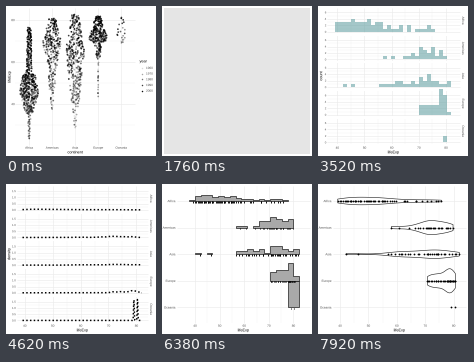
A matplotlib script that plays this animation: 150 by 150 pixels, repeating every 8 s.

```python
import matplotlib.pyplot as plt
import numpy as np
from matplotlib.animation import FuncAnimation
from matplotlib.patches import PathPatch, Rectangle
from matplotlib.textpath import TextPath
from matplotlib.transforms import Affine2D

SIZE, DPI = 150, 100
PT = 72 / DPI
TICK, INTERVAL, LOOP = 220, 20, 8000
FONT = {"family": "Liberation Sans"}

NAMES = ["Africa", "Americas", "Asia", "Europe", "Oceania"]
HUES = ["#F8766D", "#A3A500", "#00BF7D", "#00B0F6", "#E76BF3"]
TEAL, DARK, GREY, PALE = "#5F9EA0", "#595959", "#E5E5E5", "#EBEBEB"

rng = np.random.default_rng(7)


def sample(n, share, values):
    """Spread n values evenly over a quantile curve, with a little jitter."""
    u = np.linspace(0, 1, n)
    u[1:-1] += rng.uniform(-.8, .8, max(n - 2, 0)) / n
    return np.sort(np.interp(u, share, values))


def density(v, grid, adjust=1.0):
    q1, q3 = np.percentile(v, [25, 75])
    bw = 0.9 * min(v.std(ddof=1), (q3 - q1) / 1.34) * len(v) ** -0.2 * adjust
    z = (np.asarray(grid)[:, None] - v) / bw
    return np.exp(-z * z / 2).mean(1) / (bw * np.sqrt(2 * np.pi))


def history(n, *values):
    v = sample(n, [0, .05, .25, .5, .75, 1], values)
    age = np.floor((.35 * np.linspace(0, 1, n) + .65 * rng.random(n)) * 11.9)
    d = density(v, v)
    swarm = rng.uniform(-1, 1, n) * d / d.max()
    return v, age / 11, swarm, rng.random(n)


def latest(n, *values):
    return sample(n, [0, .04, .25, .5, .75, 1], values)


# Life expectancy over all years, then for the last survey only
HISTORY = [history(624, 23.6, 35.5, 42.4, 47.8, 54.4, 76.4),
           history(300, 37.6, 46, 58.4, 67, 71.7, 80.7),
           history(396, 28.8, 40, 51.4, 61.8, 69.5, 82.6),
           history(360, 43.6, 62, 69.6, 72.2, 75.5, 81.8),
           history(24, 69.1, 69.4, 71.2, 73.7, 77.6, 81.2)]
LIFE = [latest(52, 39.2, 40.5, 45.3, 51.2, 58.2, 75.7),
        latest(25, 58.1, 63.8, 69.9, 72, 75.3, 79.8),
        latest(33, 42.1, 56.8, 63.6, 71, 74.8, 82),
        latest(30, 70.8, 71.3, 74.1, 77.5, 78.9, 80.6),
        latest(2, 79.1, 79.2, 79.4, 79.7, 80, 80.4)]

fig = plt.figure(figsize=(SIZE / DPI, SIZE / DPI), dpi=DPI, facecolor="white")
scenes = []


def scene():
    ax = fig.add_axes([0, 0, 1, 1])
    ax.set(xlim=(0, SIZE), ylim=(SIZE, 0), visible=False)
    ax.axis("off")
    scenes.append(ax)
    return ax


def label(ax, x, y, s, px=3.1, color="#4D4D4D", align=.5, rot=0):
    path = TextPath((0, 0), s, size=px, prop=FONT)
    place = (Affine2D().translate(-path.get_extents().x1 * align, -.36 * px)
             .rotate_deg(rot).scale(1, -1).translate(x, y))
    ax.add_patch(PathPatch(path, fc=color, lw=0, zorder=4,
                           transform=place + ax.transData))


def title(ax, x, y, s, **kw):
    label(ax, x, y, s, 3.8, "black", **kw)


def line(ax, x, y, color="black", px=.6, **kw):
    ax.plot(x, y, color=color, lw=px * PT, **kw)


def dots(ax, x, y, px, color="black", **kw):
    ax.scatter(x, y, s=(px * PT) ** 2, c=color, linewidths=0, zorder=3, **kw)


def rect(ax, x0, y0, x1, y1, fill, edge="none", px=.6, **kw):
    ax.add_patch(Rectangle((x0, y0), x1 - x0, y1 - y0, fc=fill, ec=edge,
                           lw=0 if edge == "none" else px * PT, **kw))


def grid(ax, xs, ys, box, color=PALE, px=.6):
    x0, x1, y0, y1 = box
    ax.vlines(xs, y0, y1, color=color, lw=px * PT, zorder=.5)
    ax.hlines(ys, x0, x1, color=color, lw=px * PT, zorder=.5)


# Continent on x, life expectancy on y

def life_y(v):
    return 14 + (80 - np.asarray(v)) * 2.1


def columns(legend, right=123):
    ax = scene()
    left = 9.3
    step = (right - left) / 5.2
    cx = left + step * (np.arange(5) + .6)
    box = (left, right, 2.3, 138.6)
    grid(ax, cx, life_y([40, 60, 80]), box)
    grid(ax, [], life_y([30, 50, 70]), box, px=.3)
    for v in (40, 60, 80):
        label(ax, 8.6, life_y(v), str(v), align=1)
    for x, name in zip(cx, NAMES):
        label(ax, x, 141.6, name)
    title(ax, (left + right) / 2, 146, "continent")
    title(ax, 3.2, 71, "lifeExp", rot=90)
    for k, (name, c) in enumerate(zip(NAMES, HUES)):
        y = 61.8 + 5.7 * k
        if legend == "year":
            dots(ax, [136], [y], 1.5, alpha=.15 + .2 * k)
            label(ax, 140, y, str(1960 + 10 * k), align=0)
        else:
            rect(ax, 129.5, y - 1.9, 133.6, y + 1.9, "none", c)
            line(ax, [129.5, 133.6], [y, y], c)
            label(ax, 135.6, y, name, align=0)
    title(ax, 133.5 if legend == "year" else 129, 55, legend, align=0)
    return ax, cx, step


def swarm(legend, right=123):
    ax, cx, _ = columns(legend, right)
    for x, c, (v, age, off, _) in zip(cx, HUES, HISTORY):
        half = 6 if len(v) < 30 else 9.2
        if legend == "year":
            dots(ax, x + off * half, life_y(v), 1.7, alpha=.1 + .9 * age)
        else:
            dots(ax, x + off * half, life_y(v), 1.5, c)


def half_boxes(points):
    ax, cx, step = columns("continent")
    for x, c, (v, _, off, jit) in zip(cx, HUES, HISTORY):
        q1, med, q3 = np.percentile(v, [25, 50, 75])
        reach = 1.5 * (q3 - q1)
        lo, hi = v[v >= q1 - reach].min(), v[v <= q3 + reach].max()
        a = x - step * .375
        rect(ax, a, life_y(q3), x, life_y(q1), "white", c, .7, zorder=2)
        line(ax, [a, x], life_y([med, med]), c, 1.1)
        line(ax, [x, x], life_y([lo, q1]), c, .45)
        line(ax, [x, x], life_y([q3, hi]), c, .45)
        if points:
            spread = jit if points == "jitter" else np.abs(off)
            dots(ax, x + .6 + spread * step * .38, life_y(v), 1.1, c, alpha=.8)


def half_violins(points):
    ax, cx, step = columns("continent")
    for x, c, (v, _, _, jit) in zip(cx, HUES, HISTORY):
        ys = np.linspace(v.min(), v.max(), 150)
        d = density(v, ys)
        ax.fill(np.r_[x, x - d / d.max() * step * .42, x],
                life_y(np.r_[ys[0], ys, ys[-1]]), fc="white", ec=c,
                lw=.7 * PT, zorder=2)
        if points:
            dots(ax, x + .6 + jit * step * .38, life_y(v), 1.1, c, alpha=.8)


# Life expectancy on x

def scale(x40, x80):
    return lambda v: x40 + (np.asarray(v) - 40) * (x80 - x40) / 40


def x_axis(ax, sx, box, color=PALE):
    ticks = np.arange(40, 81, 10)
    grid(ax, sx(ticks), [], box, color)
    grid(ax, sx(ticks[:-1] + 5), [], box, color, .3)
    for t in ticks:
        label(ax, sx(t), 141.6, str(t))
    title(ax, (box[0] + box[1]) / 2, 146, "lifeExp")


def blank():
    rect(scene(), 1.5, 1.8, 147.5, 147.5, GREY)


def empty_panel():
    ax = scene()
    rect(ax, 3, 1.8, 147.5, 138, GREY, zorder=.2)
    x_axis(ax, scale(14, 135), (3, 147.5, 1.8, 138), "white")


# One facet per continent

PANEL_H, PANEL_STEP = 24.85, 27.65


def facets(ylab, levels, unit, box, sx, form="{}", grey=False):
    ax = scene()
    left, right = box
    ink = "white" if grey else PALE
    tops = 2.1 + PANEL_STEP * np.arange(5)
    bases = tops + PANEL_H * .9545
    x_axis(ax, sx, (left, right, tops[0], tops[-1] + PANEL_H), ink)
    for top, base, name in zip(tops, bases, NAMES):
        bottom = top + PANEL_H
        ys = base - np.array(levels) * unit
        if grey:
            rect(ax, left, top, right, bottom, GREY, zorder=.2)
            rect(ax, right, top, 148, bottom, "#D9D9D9", zorder=.2)
        rect(ax, left, bottom, right, top + PANEL_STEP, "white", zorder=.8)
        grid(ax, [], ys, (left, right, top, bottom), ink)
        grid(ax, [], (ys[1:] + ys[:-1]) / 2, (left, right, 0, 0), ink, .3)
        for y, n in zip(ys, levels):
            label(ax, left - .8, y, form.format(n), 2.8, align=1)
        label(ax, 145.2, top + PANEL_H / 2, name, rot=-90)
    title(ax, 2.8, 70, ylab, rot=90)
    return ax, bases


WIDTH = 1.476
EDGES = (np.arange(26, 57) - .5) * WIDTH


def hist_facets(kind="bars", color=TEAL, alpha=.57, grey=False):
    sx, unit = scale(19.3, 128), 3.24
    ax, bases = facets("count", [0, 2, 4, 6], unit, (9, 141.5), sx, grey=grey)
    for v, base in zip(LIFE, bases):
        n = np.histogram(v, EDGES)[0]
        if kind == "bars":
            ax.bar(sx(EDGES[:-1]), -n * unit, WIDTH * 108.7 / 40, bottom=base,
                   align="edge", color=color, alpha=alpha, lw=0,
                   antialiased=False)
        elif kind == "line":
            line(ax, sx((EDGES[1:] + EDGES[:-1]) / 2), base - n * unit, color)
        elif kind == "rug":
            ax.vlines(sx(v), base, base - 2, color="black", lw=.5 * PT)


def density_facets(adjust=.3, dotted=False, fill=None):
    sx, unit = scale(18.7, 130.4), 12.5
    ax, bases = facets("density", [0.0, 0.5, 1.0, 1.5], unit, (10.5, 142),
                       sx, "{:.1f}")
    xs = np.linspace(39.2, 82, 420)
    for v, base, hue in zip(LIFE, bases, HUES):
        ys = base - density(v, xs, adjust) * unit
        if fill:
            ax.fill_between(sx(xs), ys, base, alpha=.6, lw=0,
                            color=hue if fill == "hues" else fill)
        if dotted:
            line(ax, sx(xs), ys, px=1.5, ls=(0, (1, 1.5)))
        else:
            line(ax, sx(xs), ys)


# One row per continent

ROWS = 17 + 26.6 * np.arange(5)


def rows(sx):
    ax = scene()
    box = (14.5, 148, 1.5, 138.6)
    x_axis(ax, sx, box)
    grid(ax, [], ROWS, box)
    for y, name in zip(ROWS, NAMES):
        label(ax, 13.4, y, name, align=1)
    return ax


def runs(mask):
    jumps = np.flatnonzero(np.diff(np.r_[0, mask.astype(int), 0]))
    return zip(jumps[::2], jumps[1::2])


def ridges(kind, ticks=False):
    sx = scale(33, 131.4)
    ax = rows(sx)
    edges = 80 + 2.35 * np.arange(-18, 2)
    xs = np.linspace(37, 84, 240)
    for k, (v, y) in enumerate(zip(LIFE, ROWS)):
        if kind == "bins":
            h = np.histogram(v, edges)[0] / len(v) * 52
            for a, b in runs(h > 0):
                ax.fill(np.repeat(sx(edges[a:b + 1]), 2),
                        np.r_[y, y - np.repeat(h[a:b], 2), y],
                        fc="#A9A9A9", ec="black", lw=.6 * PT, zorder=1 + k / 10)
        elif len(v) > 2:
            d = y - density(v, xs) * 190
            ax.fill_between(sx(xs), d, y, color="#A9A9A9", lw=0)
            line(ax, sx(xs), d)
        if ticks:
            ax.vlines(sx(v), y + .1, y + 1.5, color="black", lw=.9 * PT,
                      zorder=3)


def violins(shape=None, points=True):
    sx = scale(22, 135.6)
    ax = rows(sx)
    for v, y in zip(LIFE, ROWS):
        if shape == "violin" and len(v) > 2:
            xs = np.linspace(v.min(), v.max(), 200)
            d = density(v, xs) * 95
            ax.fill(sx(np.r_[xs, xs[::-1]]), np.r_[y - d, (y + d)[::-1]],
                    fc="white", ec="#222222", lw=.6 * PT, zorder=1)
        elif shape == "box":
            q1, med, q3 = np.percentile(v, [25, 50, 75])
            rect(ax, sx(q1), y - 10, sx(q3), y + 10, "white", "#333333")
            line(ax, sx([med, med]), [y - 10, y + 10], px=1.1)
            line(ax, sx([v.min(), q1]), [y, y])
            line(ax, sx([q3, v.max()]), [y, y])
        if points:
            dots(ax, sx(v), np.full(len(v), y), 1.8)


def build():
    swarm("year", right=129)
    swarm("continent")
    half_boxes(None)
    half_boxes("swarm")
    half_boxes("jitter")
    half_violins(False)
    half_violins(True)
    half_violins(True)

    blank()
    empty_panel()
    hist_facets(None, grey=True)
    hist_facets("rug", grey=True)
    hist_facets(color=DARK, alpha=1, grey=True)
    hist_facets(color=DARK, alpha=1)
    hist_facets(color=TEAL, alpha=1)
    hist_facets()
    hist_facets()
    hist_facets("line", "black")
    density_facets(1)
    density_facets(1, fill=TEAL)
    density_facets()
    density_facets(dotted=True)
    density_facets(dotted=True, fill=TEAL)
    density_facets(fill=TEAL)
    density_facets(fill="hues")
    density_facets(1, fill="hues")

    ridges("curve")
    ridges("curve", ticks=True)
    ridges("bins")
    ridges("bins", ticks=True)
    ridges("bins", ticks=True)

    violins(points=False)
    violins()
    violins("box", points=False)
    violins("violin", points=False)
    violins("box")
    violins("violin")


def update(i):
    now = i * INTERVAL // TICK
    for k, ax in enumerate(scenes):
        ax.set_visible(k == now)
    return scenes


build()
anim = FuncAnimation(fig, update, frames=LOOP // INTERVAL, interval=INTERVAL,
                     init_func=lambda: update(0), repeat=True, repeat_delay=0)
plt.show()
```
